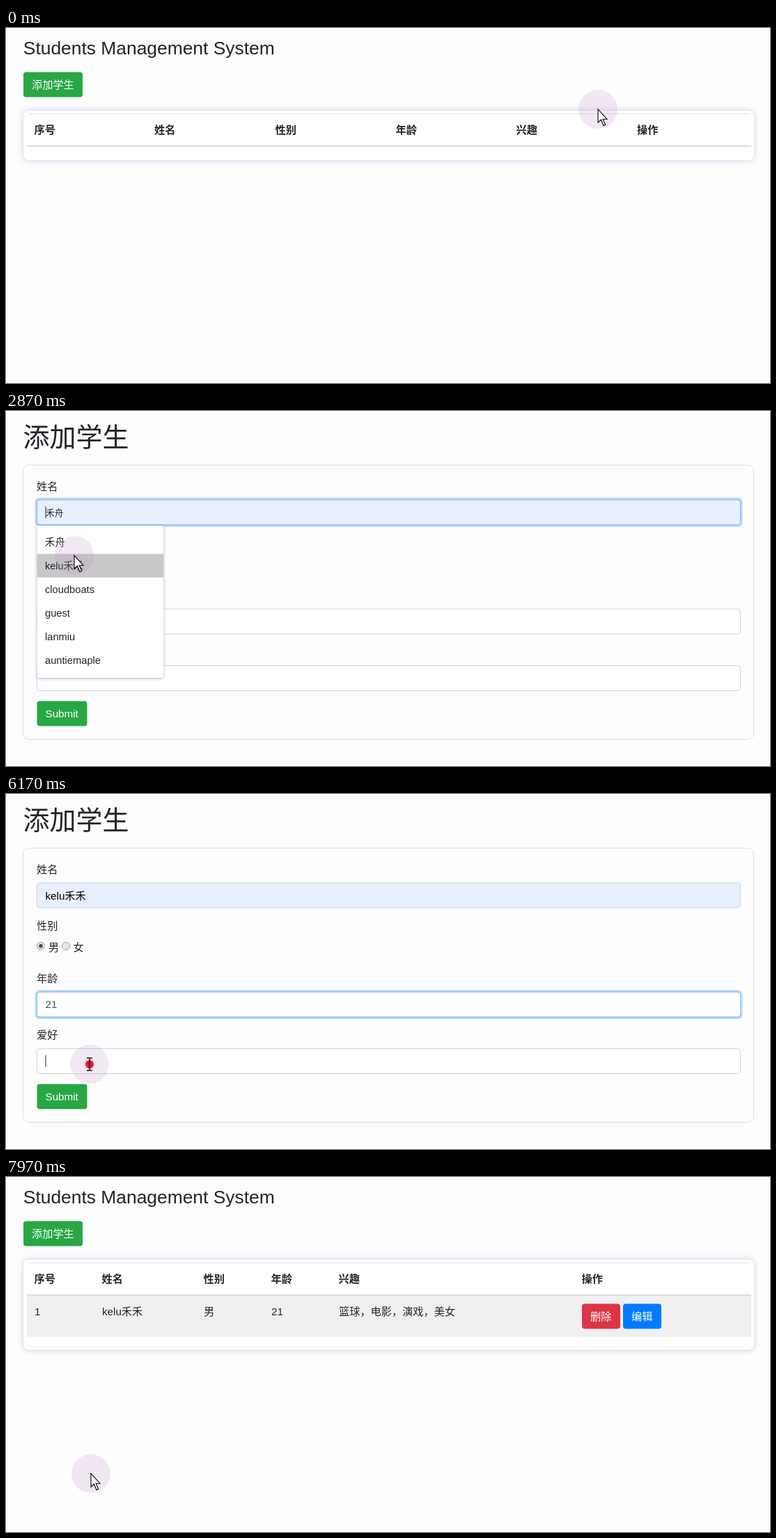
These frames come from a looping animation (1097x511 px, 8 s). An HTML page:

```html
<!DOCTYPE html>
<html lang="zh-CN">
<head>
<meta charset="utf-8">
<title>Students Management System</title>
<style>
html, body { margin: 0; width: 100%; height: 100%; overflow: hidden; background: #fdfdfd; }
svg { display: block; font-family: "Liberation Sans", "Noto Sans CJK SC", sans-serif; }
.shadow { filter: drop-shadow(0 0 4px rgba(120, 120, 200, .28)); }
.menu { filter: drop-shadow(0 1px 2px rgba(60, 60, 140, .4)); }
</style>
</head>
<body>
<svg id="stage" width="1097" height="511" viewBox="0 0 1097 511"></svg>
<script>
const LOOP = 8000;
const stage = document.getElementById('stage');

const NAME = 'kelu禾禾';
const HOBBY = '篮球，电影，演戏，美女';
const NAMES = ['禾舟', NAME, 'cloudboats', 'guest', 'lanmiu', 'auntiemaple'];
const HOBBIES = [HOBBY, 'Dancing', '篮球，数码，游戏'];

// Moments at which the interface reacts
const T = {
  addHover: 900, addClick: 1380, formOpen: 1720,
  nameFocus: 2280, nameMenu: 2380, namePick: 3100,
  radio: 3800, ageFocus: 4100, spinnerOff: 4720, key2: 4900, key1: 5200,
  hobbyFocus: 6140, hobbyMenu: 6300, hobbyPick: 6790,
  submit: 7220, listOpen: 7450
};
const CLICKS = [T.addClick, T.nameFocus, T.namePick, T.radio, T.ageFocus, T.hobbyFocus, T.hobbyPick, T.submit];

// Pointer path: time, x, y
const PATH = [
  [30, 850, 117], [170, 800, 121], [330, 800, 121], [930, 80, 86], [1970, 80, 86],
  [2250, 94, 148], [2400, 94, 150], [2830, 98, 208], [2900, 98, 208], [3080, 98, 222],
  [3400, 98, 222], [3780, 57, 219], [3850, 57, 219], [4080, 122, 304], [4350, 126, 306],
  [4640, 126, 331], [5300, 126, 336], [5720, 94, 410], [6080, 120, 389], [6300, 120, 389],
  [6600, 122, 430], [6850, 122, 430], [7150, 106, 438], [7450, 106, 438], [7900, 122, 427]
];

const clamp = v => Math.max(0, Math.min(1, v));
const ramp = (t, start) => clamp((t - start) / 150);

function pointerAt(t) {
  const i = PATH.findIndex(p => p[0] > t);
  if (i === 0) return PATH[0].slice(1);
  if (i < 0) return PATH[PATH.length - 1].slice(1);
  const [t0, x0, y0] = PATH[i - 1], [t1, x1, y1] = PATH[i];
  const k = (t - t0) / (t1 - t0), e = k * k * (3 - 2 * k);
  return [x0 + (x1 - x0) * e, y0 + (y1 - y0) * e];
}

// Text is placed by its left edge and vertical centre, on a whole-pixel baseline
const text = (x, y, s, size = 15.2, extra = '') =>
  `<text x="${x}" y="${Math.round(y + size * .37)}" font-size="${size}" fill="#212529" ${extra}>${s}</text>`;

const rect = (x, y, w, h, r, fill, extra = '') =>
  `<rect x="${x}" y="${y}" width="${w}" height="${h}" rx="${r}" fill="${fill}" ${extra}/>`;

const button = (x, y, w, label, fill) =>
  rect(x, y, w, 36, 4, fill) + text(x + 12, y + 17.5, label, 15.2, 'style="fill:#fff"');

const caret = (x, y) => rect(x, y - 8.5, 1, 17, 0, '#222');
const blinkOn = (t, since) => (t - since) % 1060 < 530;

function table(xs, height, heads) {
  return rect(24.5, 118.5, 1050, height, 8, '#fff', 'stroke="#e2e2ee" class="shadow"') +
    rect(32, 123, 1036, 1, 0, '#dee2e6') + rect(30, 169, 1040, 2, 0, '#dcdde2') +
    heads.map((h, i) => text(xs[i] - .5, 146, h, 15.2, 'font-weight="700"')).join('');
}

function listPage(t) {
  const filled = t >= T.listOpen;
  const heads = ['序号', '姓名', '性别', '年龄', '兴趣', '操作'];
  const xs = filled ? [41, 138, 284, 381, 478, 827] : [41, 213.5, 387, 560, 733, 906.5];
  const hover = t >= T.addHover && !filled;
  let out = text(24.8, 28.2, 'Students Management System', 26.4);
  if (hover && t >= T.addClick)
    out += rect(23.5, 62, 88, 39, 5, 'none', `stroke="#28a745" stroke-width="3" opacity="${.5 * ramp(t, T.addClick)}"`);
  out += button(25, 63.5, 85, '添加学生', hover ? '#1e7e34' : '#28a745');
  out += table(xs, filled ? 131 : 72.5, heads);
  if (filled) {
    out += rect(30, 171, 1040, 59, 0, '#f0f0f1');
    out += ['1', NAME, '男', '21', HOBBY].map((s, i) => text(xs[i], 193, s)).join('');
    out += button(827, 182.5, 55, '删除', '#dc3545') + button(886, 182.5, 55, '编辑', '#007bff');
  }
  return out;
}

function field(y, focus, filled) {
  const ring = focus > 0
    ? rect(43, y - 1.5, 1013, 39, 5, 'none', `stroke="#007bff" stroke-opacity="${.27 * focus}" stroke-width="3"`) +
      rect(44.5, y, 1010, 36, 4, 'none', `stroke="#80bdff" stroke-opacity="${focus}"`)
    : '';
  return rect(44.5, y, 1010, 36, 4, filled ? '#e8f0fe' : '#fff', 'stroke="#ced4e0"') + ring;
}

const radio = (x, checked) =>
  `<circle cx="${x}" cy="218.8" r="5.5" fill="#e8e8ea" stroke="#a0a0a6"/>` +
  (checked ? `<circle cx="${x}" cy="218.8" r="2.8" fill="#4a4a50"/>` : '');

const spinner = () => rect(1028.5, 294, 13.5, 17, 0, '#eeeef0') +
  '<path d="M1031 300.5l4-4 4 4zM1031 304.5l4 4 4-4z" fill="#444"/>';

function menu(y, width, height, items, active) {
  return rect(44.5, y, width, height, 2, '#fff', 'class="menu"') + items.map((s, i) => {
    const mid = y + 23.5 + i * 34.1;
    const size = /[一-龥]/.test(s) ? 14.4 : 14.7;
    return (i === active ? rect(44.5, mid - 17, width, 34, 0, '#c8c8c8') : '') + text(56, mid, s, size);
  }).join('');
}

function formPage(t, [x, y]) {
  const nameMenu = t >= T.nameMenu && t < T.namePick;
  const hobbyMenu = t >= T.hobbyMenu && t < T.hobbyPick;
  const namePicked = t >= T.namePick, hobbyPicked = t >= T.hobbyPick;
  const nameIndex = y > 172 ? Math.floor((y - 172) / 34.1) : -1;
  const hobbyIndex = y > 411 ? Math.floor((y - 411) / 34.1) : -1;
  const namePreview = nameMenu && nameIndex >= 0, hobbyPreview = hobbyMenu && hobbyIndex >= 0;
  const pressed = t >= T.submit;

  let out = text(24.5, 36.5, '添加学生', 38);
  out += rect(24.5, 78, 1049, 394.5, 8, '#fdfdfd', 'stroke="#dcdce8"');
  out += [['姓名', 108], ['性别', 189.5], ['年龄', 265.5], ['爱好', 346.5]].map(([s, cy]) => text(44, cy, s)).join('');

  out += field(127.8, ramp(t, T.nameFocus) - ramp(t, T.radio), namePreview || namePicked);
  if (namePicked) out += text(56.5, 146.5, NAME, 15.2, 'style="fill:#000"');
  else if (namePreview) out += text(57, 146, NAMES[0], 12.7);
  if (t >= T.nameFocus && t < T.radio && (nameMenu || blinkOn(t, T.nameFocus)))
    out += caret(namePicked ? 114 : 56.5, 146);

  out += radio(50, t >= T.radio) + text(61, 220, '男') + radio(86, false) + text(96.5, 220, '女');

  const age = t >= T.key1 ? '21' : t >= T.key2 ? '2' : '';
  out += field(285, ramp(t, T.ageFocus) - ramp(t, T.hobbyFocus + 30), false);
  out += text(56.5, 302, age, 15.2, 'style="fill:#495057"');
  const lastKey = t >= T.key1 ? T.key1 : t >= T.key2 ? T.key2 : T.ageFocus;
  if (t >= T.ageFocus && t < T.hobbyFocus && blinkOn(t, lastKey)) out += caret(56.5 + age.length * 8.5, 302.5);
  if (t >= T.ageFocus - 60 && t < T.spinnerOff) out += spinner();

  out += field(366.5, ramp(t, T.hobbyFocus + 30) - ramp(t, T.submit), hobbyPreview || hobbyPicked);
  if (hobbyPicked) out += text(56.5, 384.5, HOBBY, 15.2, 'style="fill:#000"');
  else if (hobbyPreview) out += text(57, 384.5, HOBBY, 12.6);
  if (t >= T.hobbyFocus && t < T.submit && (hobbyMenu || blinkOn(t, T.hobbyFocus)))
    out += caret(hobbyPicked ? 224 : 56.5, 384.5);

  const over = !hobbyMenu && x > 44 && x < 116 && y > 417 && y < 453;
  if (pressed) out += rect(43, 416, 75, 39, 5, 'none', `stroke="#28a745" stroke-width="3" opacity="${.5 * ramp(t, T.submit)}"`);
  out += button(44.5, 417.5, 72, 'Submit', pressed ? '#1e7e34' : over ? '#218838' : '#28a745');

  if (nameMenu) out += menu(165, 181.5, 219, NAMES, nameIndex);
  if (hobbyMenu) out += menu(404, 193.5, 150, HOBBIES, hobbyIndex);
  return out;
}

function pointer(t, [x, y], onForm) {
  const overField = onForm && x > 44 && [[128, 164], [285, 321], [366, 402]].some(([a, b]) => y > a && y < b);
  const clicking = CLICKS.some(c => t >= c - 20 && t < c + 120);
  const shape = overField
    ? '<path d="M-4-9h3l1 1 1-1h3M0-8V8M-4 9h3l1-1 1 1h3" fill="none" stroke="#111" stroke-width="1.4"/>'
    : '<path d="M0 0V19l4.4-4 3.6 8.4 2.7-1.2-3.6-8H13z" fill="#fff" stroke="#000" stroke-width="1.1"/>';
  return `<g transform="translate(${x} ${y})">
    <circle r="28" fill="#be96c8" fill-opacity=".22"/>
    ${clicking ? '<circle r="7" fill="#e8103c" fill-opacity=".35"/><circle r="5.5" fill="#e8103c"/>' : ''}${shape}</g>`;
}

function draw(now) {
  const t = now % LOOP;
  const at = pointerAt(t);
  const onForm = t >= T.formOpen && t < T.listOpen;
  stage.innerHTML = (onForm ? formPage(t, at) : listPage(t)) + pointer(t, at, onForm);
  requestAnimationFrame(draw);
}
requestAnimationFrame(draw);
</script>
</body>
</html>
```
